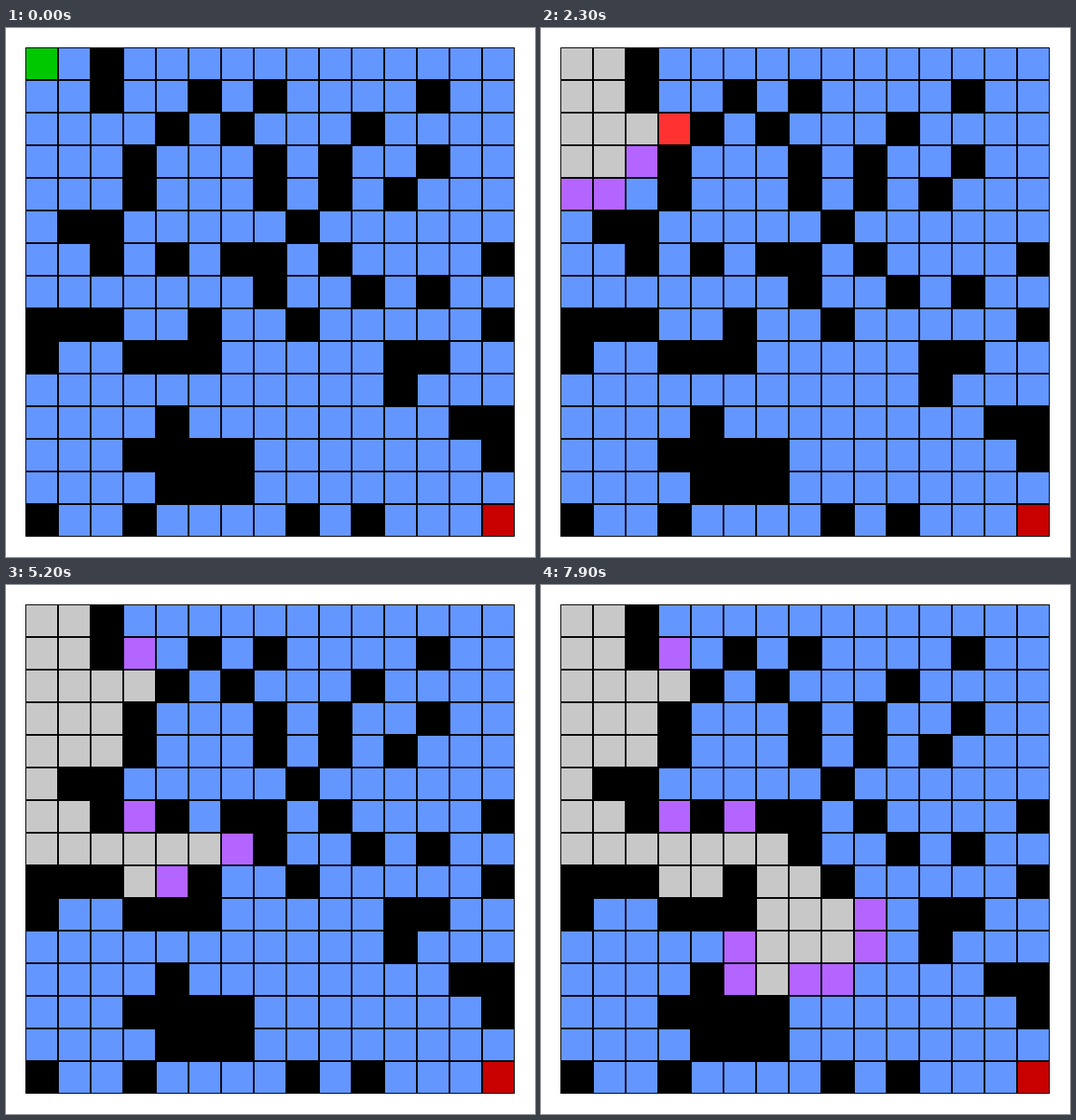
Animation of 600 by 600 pixels, one loop 8000 ms. Source, as an HTML page with a canvas:

```html
<!DOCTYPE html>
<html lang="en">
<head>
<meta charset="utf-8">
<title>Grid path search</title>
<style>
  html, body { margin: 0; width: 100%; height: 100%; overflow: hidden; background: #fff; }
  canvas { display: block; }
</style>
</head>
<body>
<canvas id="stage" width="600" height="600"></canvas>
<script>
const SIZE = 15, PITCH = 37, ORIGIN = 22, STEP_MS = 100, STEPS = 80;
const FREE = '#6496ff', OPEN = '#b464ff', CURRENT = '#ff3232', CLOSED = '#c8c8c8';
const START = '#00c800', GOAL = '#c80000';

const map = [
  '..#............',
  '..#..#.#....#..',
  '....#.#...#....',
  '...#...#.#..#..',
  '...#...#.#.#...',
  '.##.....#......',
  '..#.#.##.#....#',
  '.......#..#.#..',
  '###..#..#.....#',
  '#..###.....##..',
  '...........#...',
  '....#........##',
  '...####.......#',
  '....###........',
  '#..#....#.#....'
];
const isFree = (x, y) => map[y]?.[x] === '.';

// Binary heap ordered by f; a pop sinks the hole to a leaf, preferring the right child on ties.
const heap = [];

function siftUp(i) {
  const node = heap[i];
  while (i > 0) {
    const parent = (i - 1) >> 1;
    if (node.f >= heap[parent].f) break;
    heap[i] = heap[parent];
    i = parent;
  }
  heap[i] = node;
}

function push(node) {
  heap.push(node);
  siftUp(heap.length - 1);
}

function pop() {
  const last = heap.pop();
  if (!heap.length) return last;
  const top = heap[0];
  let i = 0, child;
  while ((child = 2 * i + 1) < heap.length) {
    const right = child + 1;
    if (right < heap.length && heap[child].f >= heap[right].f) child = right;
    heap[i] = heap[child];
    i = child;
  }
  heap[i] = last;
  siftUp(i);
  return top;
}

// A* search with Manhattan distance; every visit and every discovery is one step.
function search() {
  const steps = [], seen = new Set();
  const discover = (x, y, g) => {
    const cell = y * SIZE + x;
    if (!isFree(x, y) || seen.has(cell)) return;
    seen.add(cell);
    push({ x, y, g, cell, f: g + 2 * (SIZE - 1) - x - y });
    steps.push({ cell, color: OPEN });
  };
  discover(0, 0, 0);
  while (heap.length && steps.length < STEPS) {
    const { x, y, g, cell } = pop();
    steps.push({ cell, color: CURRENT });
    for (const [dx, dy] of [[1, 0], [0, 1], [-1, 0], [0, -1]])
      discover(x + dx, y + dy, g + 1);
  }
  return steps;
}

const steps = search();
const ctx = document.getElementById('stage').getContext('2d');

function draw(count) {
  const colors = [...map.join('')].map(c => c === '#' ? '#000' : FREE);
  colors[0] = START;
  colors[colors.length - 1] = GOAL;
  steps.slice(0, count).forEach(({ cell, color }, i) => {
    colors[cell] = color === CURRENT && i < count - 1 ? CLOSED : color;
  });

  ctx.fillStyle = '#fff';
  ctx.fillRect(0, 0, 600, 600);
  ctx.fillStyle = '#000';
  ctx.fillRect(ORIGIN, ORIGIN, SIZE * PITCH, SIZE * PITCH);
  colors.forEach((color, i) => {
    ctx.fillStyle = color;
    ctx.fillRect(ORIGIN + 1 + i % SIZE * PITCH, ORIGIN + 1 + Math.floor(i / SIZE) * PITCH,
      PITCH - 2, PITCH - 2);
  });
}

const begin = performance.now();
function tick() {
  draw(Math.floor((performance.now() - begin) / STEP_MS) % STEPS);
  requestAnimationFrame(tick);
}
tick();
</script>
</body>
</html>
```
